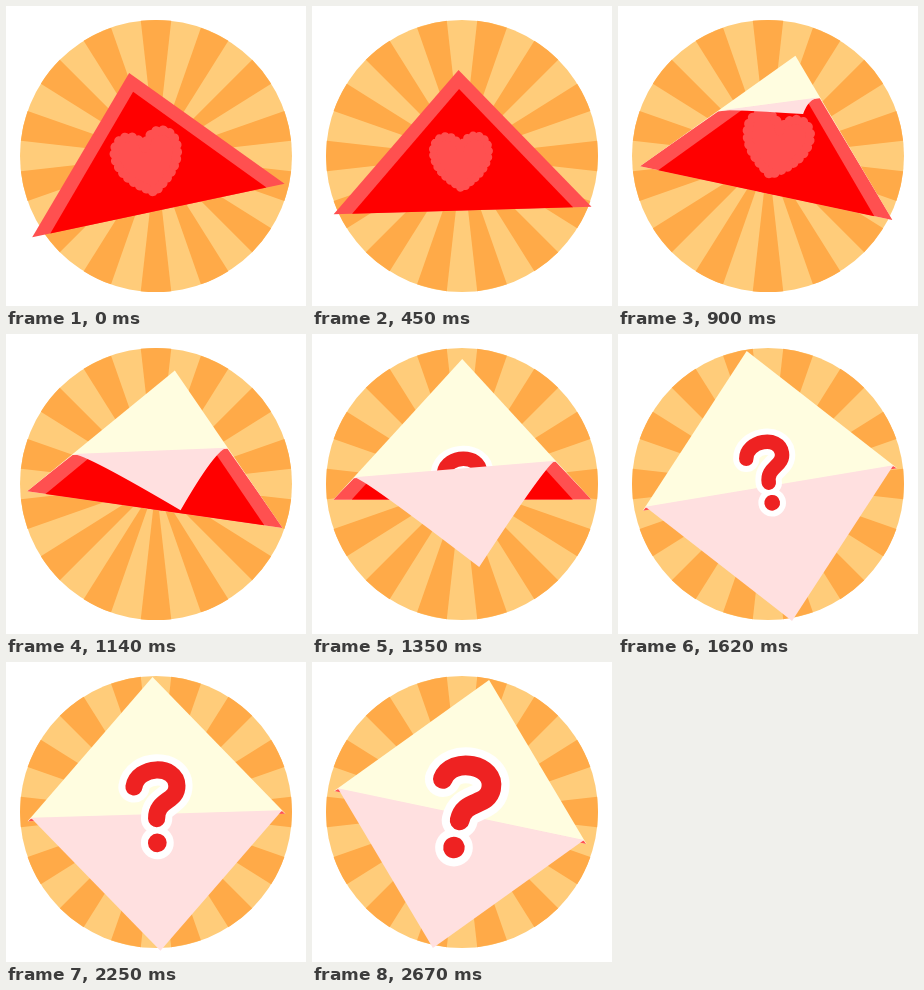
An HTML page with a canvas for the animation above (2.7 s loop, 300x300 px).

```html
<!DOCTYPE html>
<html lang="en">
<head>
<meta charset="utf-8">
<title>Opening card</title>
<style>
html, body { margin: 0; width: 100%; height: 100%; overflow: hidden; background: #fff; }
canvas { display: block; width: 300px; height: 300px; }
</style>
</head>
<body>
<canvas id="stage" width="300" height="300"></canvas>
<script>
const ctx = document.getElementById('stage').getContext('2d');
const LOOP = 2700, BEAT = 450, HALF_WIDTH = 129, HEIGHT = 140.5, RAYS = 14;
const RED = '#ff0000', ROSE = '#ff5050', CREAM = '#fffde0', PINK = '#ffe0e0';
const heart = new Path2D('M0-17C4-29 13-32 19-31C28-29 33-20 31-9C28 9 12 20 0 28C-12 20-28 9-31-9C-33-20-28-29-19-31C-13-32-4-29 0-17Z');
const hook = new Path2D('M-21.5-20C-18-41 21-42 21-20C21-4 0-7 0 12');
const dot = new Path2D('M0 36h.01');

const clamp = x => Math.min(1, Math.max(0, x));
const mix = (a, b, k) => a + (b - a) * k;
const ease = (t, from, to) => {
  const k = clamp((t - from) / (to - from));
  return k * k * (3 - 2 * k);
};

function trace(...points) {
  ctx.beginPath();
  points.forEach(p => ctx.lineTo(...p));
  ctx.closePath();
}

function triangle(color, halfWidth, height) {
  trace([-halfWidth, 0], [0, -height], [halfWidth, 0]);
  ctx.fillStyle = color;
  ctx.fill();
}

// Light and dark rays trade places on every beat.
function drawRays(t) {
  const step = Math.PI / RAYS;
  const swap = Math.floor(t / BEAT) % 2;
  ctx.fillStyle = '#ffcc7a';
  ctx.beginPath();
  ctx.arc(150, 150, 136, 0, 7);
  ctx.fill();
  ctx.fillStyle = '#ffaa48';
  for (let i = 0; i < RAYS; i++) {
    const a = Math.PI / 2 + (2 * i + swap - 0.5) * step;
    ctx.beginPath();
    ctx.moveTo(150, 150);
    ctx.arc(150, 150, 136, a, a + step);
    ctx.fill();
  }
}

function drawHeart(t) {
  const size = 0.94 + 0.06 * Math.cos(Math.PI * t / BEAT);
  ctx.save();
  ctx.translate(0, -47);
  ctx.scale(size, size);
  ctx.fillStyle = ctx.strokeStyle = ROSE;
  ctx.fill(heart);
  ctx.lineWidth = 10;
  ctx.lineCap = 'round';
  ctx.setLineDash([0, 7]);
  ctx.stroke(heart);
  ctx.restore();
}

function drawQuestion(t) {
  const size = mix(0.85, 1.17, clamp((t - 1800) / 900));
  const y = -10 - 12 * ease(t, 1350, 1830) + 11 * ease(t, 1830, 2250);
  ctx.save();
  ctx.translate(0, y);
  ctx.scale(size, size);
  ctx.lineCap = ctx.lineJoin = 'round';
  for (const [color, extra] of [['#fff', 14], ['#ee2222', 0]]) {
    ctx.strokeStyle = color;
    ctx.lineWidth = 17 + extra;
    ctx.stroke(hook);
    ctx.lineWidth = 18.5 + extra;
    ctx.stroke(dot);
  }
  ctx.restore();
}

function drawFront(t) {
  triangle(ROSE, HALF_WIDTH, HEIGHT);
  triangle(RED, HALF_WIDTH - 18.5, HEIGHT - 19);
  drawHeart(t);
}

// The flap rolls over a slanted crease; its tip mirrors the apex, less the roll.
function drawFlap(t, open) {
  const edgePoint = (side, folded) => [side * HALF_WIDTH * folded, HEIGHT * (folded - 1)];
  const L = edgePoint(-1, 0.975 * open ** 0.65);
  const R = edgePoint(1, 0.975 * open ** 1.3);
  const dx = R[0] - L[0], dy = R[1] - L[1], length = Math.hypot(dx, dy) || 1;
  const nx = -dy / length, ny = dx / length;
  const depth = L[0] * nx + (L[1] + HEIGHT) * ny;
  const reach = 2 * depth - Math.min(depth, 44 - 0.32 * depth);
  const tip = [nx * reach, -HEIGHT + ny * reach];

  ctx.save();
  trace([-HALF_WIDTH - 9, 9], [L[0], L[1] + 1], [R[0], R[1] + 1], [HALF_WIDTH + 9, 9]);
  ctx.clip();
  drawFront(t);
  ctx.restore();

  const roll = 0.18 * (1 - open);
  const toward = (p, q) => [mix(p[0], q[0], roll), mix(p[1], q[1], roll)];
  ctx.beginPath();
  ctx.moveTo(...L);
  ctx.quadraticCurveTo(...toward(L, R), ...tip);
  ctx.quadraticCurveTo(...toward(R, L), ...R);
  ctx.closePath();
  ctx.fillStyle = PINK;
  ctx.fill();
}

function drawCard(t, open) {
  if (open === 0) return drawFront(t);
  triangle(CREAM, HALF_WIDTH, HEIGHT);
  if (open < 1) {
    ctx.save();
    ctx.beginPath();
    ctx.rect(-HALF_WIDTH, -HEIGHT, 2 * HALF_WIDTH, HEIGHT);
    ctx.clip();
    drawQuestion(t);
    ctx.restore();
  }
  drawFlap(t, open);
  if (open === 1) drawQuestion(t);
}

function draw(t) {
  const phase = Math.PI * t / 900, s = Math.sin(phase);
  const angle = (-12 * Math.cos(phase) - 0.85 * (s + s * s)) * Math.PI / 180;
  const open = clamp((t - 540) / 1020);
  ctx.clearRect(0, 0, 300, 300);
  drawRays(t);
  ctx.save();
  ctx.translate(150.3 - 10 * Math.sin(angle), mix(204.5, 155.5, open));
  ctx.rotate(angle);
  drawCard(t, open);
  ctx.restore();
}

function tick() {
  draw(performance.now() % LOOP);
  requestAnimationFrame(tick);
}
tick();
</script>
</body>
</html>
```
